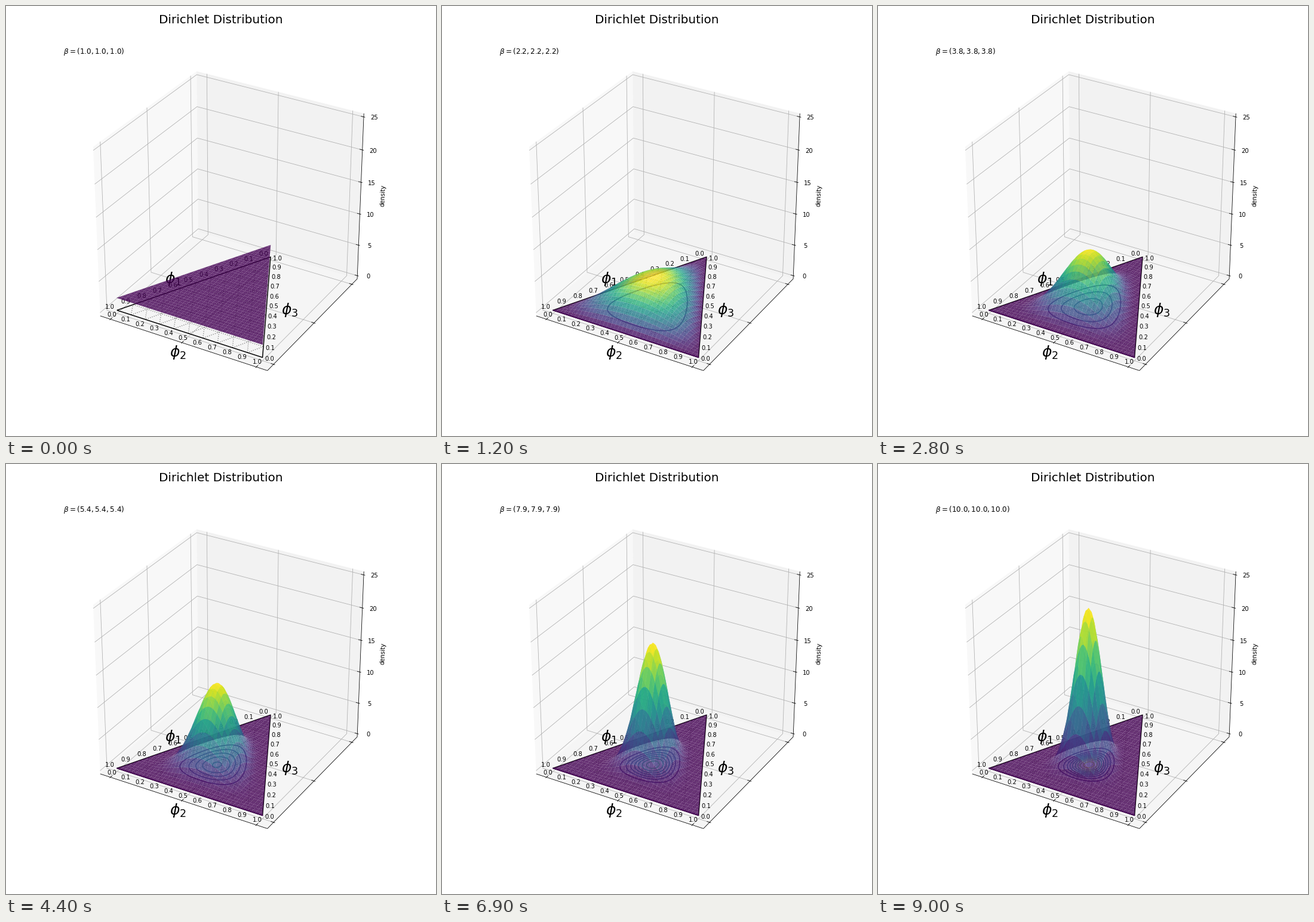
Animation, 720 px wide and 720 px high, one loop 9.1 s. Source, as a matplotlib script:

```python
from math import exp, lgamma

import matplotlib.pyplot as plt
import numpy as np
from matplotlib.animation import FuncAnimation
from matplotlib.collections import LineCollection, PolyCollection

SIZE, FRAMES, INTERVAL = 720, 91, 100
SCALE, CX, CY, DIST = 3102, 376.4, 351, 10
Z_MAX, STRIDE, ALPHA = 25, 2, 0.8
LO, HI = -0.05 - 1.1 / 48, 1.05 + 1.1 / 48
Z_LO, Z_HI = -Z_MAX / 48, Z_MAX * 49 / 48
LEVELS = np.arange(2.5, 25, 2.5)
VIRIDIS = plt.get_cmap("viridis")

plt.rcParams["font.family"] = "DejaVu Sans"


def project(x, y, z=0.0):
    """Perspective view (elev 30, azim -60): pixel x, pixel y, depth."""
    x = (np.asarray(x) + 0.05) / 1.1 - 0.5
    y = (np.asarray(y) + 0.05) / 1.1 - 0.5
    z = np.asarray(z) / Z_MAX - 0.5
    c, s = np.cos(np.pi / 6), 0.5
    depth = DIST - (c * s * x - c * c * y + s * z)
    px = CX + SCALE * (c * x + s * y) / depth
    py = CY - SCALE * (-s * s * x + s * c * y + c * z) / depth
    return px, py, depth


def path(*points):
    return [project(*p)[:2] for p in points]


def density(x, y, a):
    prod = np.clip((1 - x - y / 2) * (x - y / 2) * y, 0, None)
    return exp(lgamma(3 * a) - 3 * lgamma(a)) * prod ** (a - 1)


fig = plt.figure(figsize=(SIZE / 72, SIZE / 72), dpi=72, facecolor="white")
ax = fig.add_axes([0, 0, 1, 1])
ax.set_xlim(0, SIZE)
ax.set_ylim(SIZE, 0)
ax.axis("off")
fig.suptitle("Dirichlet Distribution", fontsize=20)


def lines(segments, color, width, zorder, style="solid"):
    ax.add_collection(LineCollection(segments, colors=color, linewidths=width,
                                     linestyles=style, zorder=zorder), autolim=False)


def label(x, y, text, size=10, **kw):
    ax.text(x, y, text, fontsize=size, ha="center", va="center", zorder=5, **kw)


def draw_box():
    panes = [
        (0.95, [(LO, LO, Z_LO), (LO, HI, Z_LO), (LO, HI, Z_HI), (LO, LO, Z_HI)]),
        (0.90, [(LO, HI, Z_LO), (HI, HI, Z_LO), (HI, HI, Z_HI), (LO, HI, Z_HI)]),
        (0.925, [(LO, LO, Z_LO), (HI, LO, Z_LO), (HI, HI, Z_LO), (LO, HI, Z_LO)]),
    ]
    for gray, corners in panes:
        ax.fill(*zip(*path(*corners)), color=(gray,) * 3, alpha=0.5, lw=0, zorder=0)

    grid, ticks = [], []
    out, inn = 1.1 / 120, 1.1 / 60
    for t in (0, 0.5, 1):
        grid.append(path((t, LO, Z_LO), (t, HI, Z_LO), (t, HI, Z_HI)))
        grid.append(path((HI, t, Z_LO), (LO, t, Z_LO), (LO, t, Z_HI)))
        ticks.append(path((t, LO - out, Z_LO), (t, LO + inn, Z_LO)))
        ticks.append(path((HI + out, t, Z_LO), (HI - inn, t, Z_LO)))
    for z in range(0, Z_MAX + 1, 5):
        grid.append(path((LO, LO, z), (LO, HI, z), (HI, HI, z)))
        ticks.append(path((HI + out, HI, z), (HI - inn, HI, z)))
        px, py, _ = project(HI, HI, z)
        label(px + 18, py + 1.5, str(z))
    lines(grid, "#b0b0b0", 0.8, 1)
    axes = [path((LO, LO, Z_LO), (HI, LO, Z_LO)),
            path((HI, LO, Z_LO), (HI, HI, Z_LO)),
            path((HI, HI, Z_LO), (HI, HI, Z_HI))]
    lines(axes + ticks, "black", 0.8, 2)
    label(631, 317, "density", rotation=87.5)


def draw_simplex():
    a, b, c = np.array([(0, 0), (1, 0), (0.5, 1)])
    lines([path(a, b, c, a)], "black", 1.5, 4)

    dots = []
    for t in np.arange(1, 10) / 10:
        for p, q, r in ((a, b, c), (b, c, a), (c, a, b)):
            dots.append(path(p + t * (q - p), p + t * (r - p)))
    lines(dots, "gray", 1.3, 3, "dotted")

    # edge scales: start, end, pixel offset
    for p, q, dx, dy in ((a, b, -9, 8), (c, a, -12, -5), (b, c, 11.5, 2.5)):
        for k in range(11):
            px, py, _ = project(*(p + k / 10 * (q - p)))
            label(px + dx, py + dy, f"{k / 10:.1f}")
    for n, pos in enumerate(((280, 457), (288, 580), (475, 509)), 1):
        label(*pos, rf"$\phi_{n}$", 25)


draw_box()
draw_simplex()
beta = ax.text(96.5, 80, "", fontsize=12, zorder=9)

# square mesh squeezed onto the triangle, in cells of STRIDE steps
g = np.linspace(0, 1, 40 * STRIDE + 1)
mesh_x, mesh_y = np.meshgrid(g, g)
mesh_x = np.clip(mesh_x, mesh_y / 2, 1 - mesh_y / 2)
rows, cols = (v.reshape(-1, 1) for v in np.mgrid[0:80:STRIDE, 0:80:STRIDE])
rows = rows + np.array([0, 0, 0, 1, 2, 2, 2, 1])
cols = cols + np.array([0, 1, 2, 2, 2, 1, 0, 0])
cell_x, cell_y = mesh_x[rows, cols], mesh_y[rows, cols]
width = np.maximum(cell_x[:, 2] - cell_x[:, 0], cell_x[:, 4] - cell_x[:, 6])
cell_x, cell_y = cell_x[width > 1e-9], cell_y[width > 1e-9]

surface = PolyCollection([], edgecolors="none", linewidths=0, zorder=7)
ax.add_collection(surface, autolim=False)

# floor grid for the contour lines
fine = np.linspace(0, 1, 121)
floor_x, floor_y = np.meshgrid(fine, fine)
inside = (floor_x >= floor_y / 2) & (floor_x <= 1 - floor_y / 2)
floor_px, floor_py, _ = project(floor_x, floor_y)
base, = ax.plot(*zip(*path((0, 0), (1, 0))), color=VIRIDIS(0.0), lw=1.5, zorder=8)
contours = []


def draw_contours(a):
    while contours:
        contours.pop().remove()
    z = np.ma.masked_where(~inside, density(floor_x, floor_y, a))
    levels = LEVELS[LEVELS < z.max()]
    if a > 1 and len(levels):
        contours.append(ax.contour(floor_px, floor_py, z, levels=levels, cmap=VIRIDIS,
                                   vmin=0, vmax=Z_MAX, linewidths=1.5, zorder=6))


def update(i):
    a = 1 + i / 10
    z = density(cell_x, cell_y, a)
    px, py, depth = project(cell_x, cell_y, z)
    order = np.argsort(-depth.mean(axis=1))
    height = z.mean(axis=1)
    shade = (height - height.min()) / max(np.ptp(height), 1e-9)
    surface.set_verts(np.dstack([px, py])[order])
    surface.set_facecolor(VIRIDIS(shade[order], alpha=ALPHA))
    draw_contours(a)
    base.set_visible(i > 0)
    beta.set_text(rf"$\beta = ({a:.1f}, {a:.1f}, {a:.1f})$")
    return surface, base, beta


anim = FuncAnimation(fig, update, frames=FRAMES, interval=INTERVAL,
                     init_func=lambda: update(0), repeat=True, repeat_delay=0)
plt.show()
```
